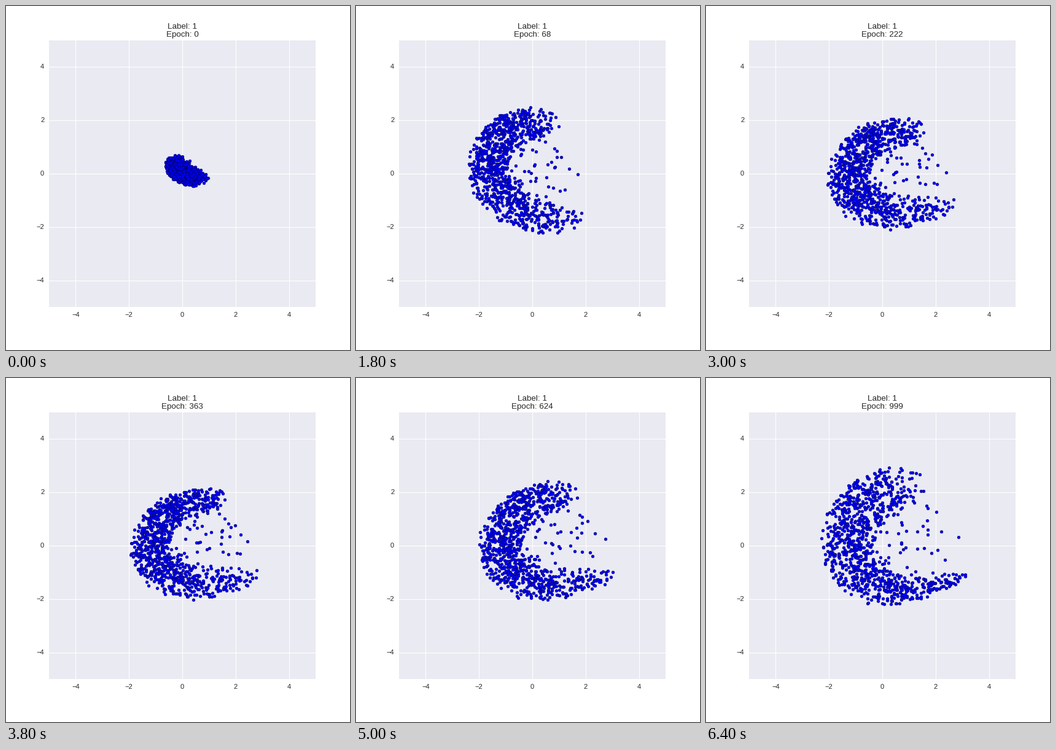
Write a matplotlib script that moves like this. It is 560x560 px and loops after 6500 ms.

```python
import numpy as np
import matplotlib.pyplot as plt
from matplotlib.animation import FuncAnimation

plt.rcParams["font.family"] = "Liberation Sans"
INK = "#262626"
FRAMES, INTERVAL = 65, 100
COUNT = 1000

# The cloud follows a Bezier curve that moves through a few key shapes.
# Each row: four control points, then thickness at start, middle bulge, end.
KEY_AT = np.array([0, 8, 18, 40, 64])
KEYS = np.array([
    [-.25, .4, -.4, .2, .1, -.1, .7, -.15, .35, .05, .35],
    [-.8, 3.2, -4, 3, -1.7, 0, -.5, -2.8, .45, -.15, .95],
    [.5, 1.9, -2.6, 2.1, -2.4, -2, 1.6, -1.65, .6, .2, .6],
    [1.35, 1.8, -2.2, 1.7, -2.3, -2.5, 2.7, -1.1, .4, .3, .5],
    [.8, 2.2, -2.4, 1.9, -2.2, -3.3, 3.1, -1.1, .9, .45, .2]])
SLOPES = np.gradient(KEYS, KEY_AT, axis=0)

rng = np.random.default_rng(11)
along = rng.beta(1.2, 1.3, COUNT)[:, None]
angle = rng.random(COUNT) * 2 * np.pi
spread = np.column_stack([np.cos(angle), np.sin(angle)])
spread *= np.sqrt(rng.random((COUNT, 1)))
pull = rng.random((COUNT, 1)) ** 25
phase = rng.random((COUNT, 2)) * 2 * np.pi


def epoch(frame):
    """One epoch per frame at first, then ever longer steps."""
    if frame < 8:
        return frame
    return round(7.3 + 991.7 * ((frame - 7.3) / 56.7) ** 1.673)


def shape(frame):
    """Smooth blend of the key shapes."""
    i = min(np.searchsorted(KEY_AT, frame, "right"), len(KEY_AT) - 1) - 1
    h = KEY_AT[i + 1] - KEY_AT[i]
    s = (frame - KEY_AT[i]) / h
    return ((1 + 2 * s) * (1 - s) ** 2 * KEYS[i]
            + s * (1 - s) ** 2 * h * SLOPES[i]
            + s ** 2 * (3 - 2 * s) * KEYS[i + 1]
            + s ** 2 * (s - 1) * h * SLOPES[i + 1])


def cloud(frame):
    key = shape(frame)
    a, b, c, d = key[:8].reshape(4, 2)
    start, bulge, end = key[8:]
    t, r = along, 1 - along
    spine = r**3 * a + 3 * r**2 * t * b + 3 * r * t**2 * c + t**3 * d
    thick = start * r + end * t + bulge * np.sin(np.pi * t)
    # a few points stray into the gap between the two tips
    spine += pull * ((a + d) / 2 - spine)
    wobble = .04 * min(frame / 8, 1) * np.sin(frame * .8 + phase)
    return spine + thick * spread + wobble


fig = plt.figure(figsize=(7, 7), dpi=80, facecolor="white")
ax = fig.add_axes([.125, .125, .775, .775], facecolor="#EAEAF2")
ticks = range(-4, 5, 2)
ax.set(xlim=(-5, 5), ylim=(-5, 5), xticks=ticks, yticks=ticks)
ax.set_axisbelow(True)
ax.grid(color="white", lw=1, ls="-")
ax.tick_params(length=0, pad=7, labelsize=10, labelcolor=INK)
plt.setp(ax.get_yticklabels(), va="center")
for side in ax.spines.values():
    side.set_visible(False)

dots = ax.scatter(*cloud(0).T, s=20, c="blue", edgecolors="black", linewidths=.3)


def heading(y, text):
    return fig.text(287 / 560, y / 560, text, size=12, color=INK,
                    ha="center", va="baseline")


heading(523, "Label: 1")
title = heading(510, "Epoch: 0")


def draw(frame):
    dots.set_offsets(cloud(frame))
    title.set_text(f"Epoch: {epoch(frame)}")
    return dots, title


anim = FuncAnimation(fig, draw, frames=FRAMES, interval=INTERVAL,
                     repeat=True, repeat_delay=0, blit=False)
plt.show()
```
